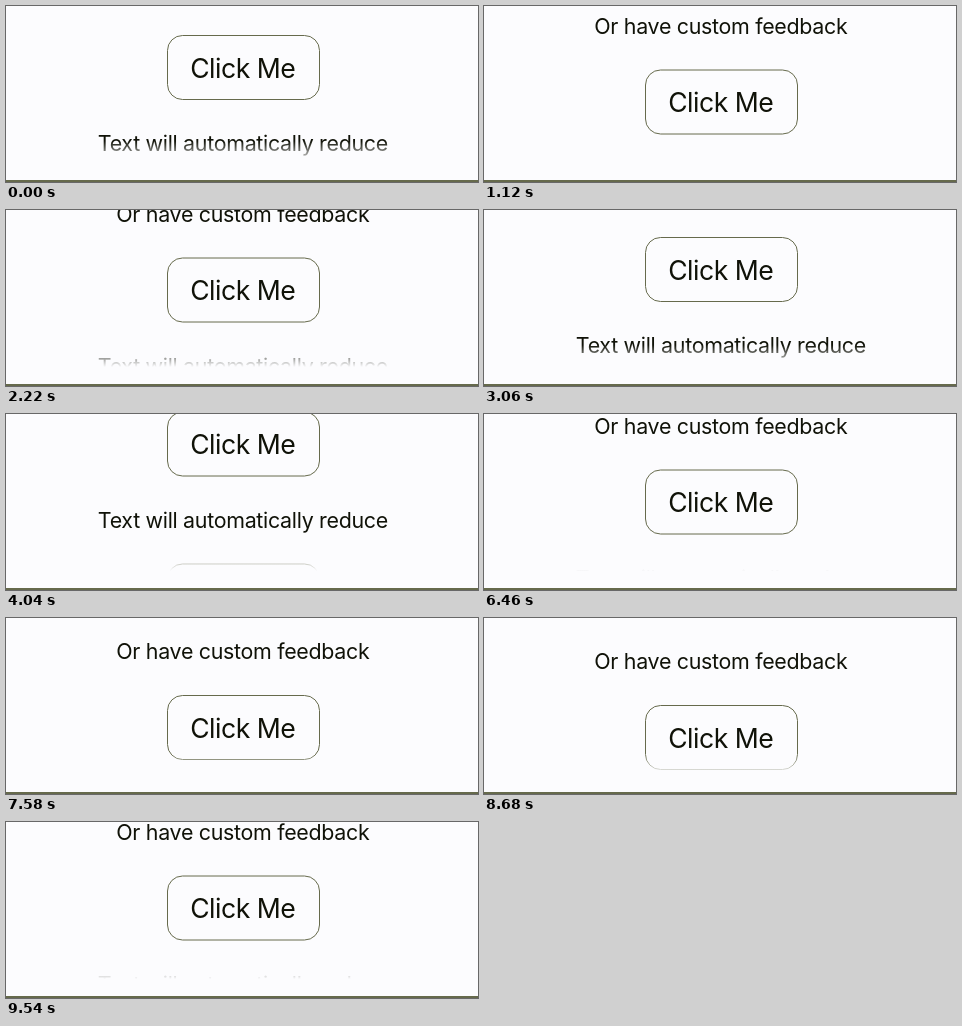
Animation, 472 px wide and 176 px high, one loop 9.56 s. Source, as an HTML page with a canvas:

```html
<!DOCTYPE html>
<html lang="en">
<head>
<meta charset="utf-8">
<style>
  html, body { margin: 0; width: 100%; height: 100%; overflow: hidden; background: #fcfcfe; }
  canvas { display: block; }
</style>
</head>
<body>
<canvas id="stage" width="472" height="176"></canvas>
<script>
const ctx = document.getElementById('stage').getContext('2d');
const LOOP = 9560, CENTER = 237, ROW = 152;
const INK = '#101208', EDGE = '#666a4c', PAPER = '#fcfcfe';

// Resting tops of the first button: one long flick, then flicks at a steady beat.
const START = 29, FIRST_REST = 66;
const RESTS = [38, 8, -20, 12, 57, 77, 87, 53.5];
const FIRST_BEAT = 1960, BEAT = 977, FLICK = 870;

// Eased progress of a flick that starts at `from`.
function progress(t, from, duration, power) {
  const p = Math.min(1, Math.max(0, (t - from) / duration));
  return 1 - (1 - p) ** power;
}

function buttonTop(t) {
  let top = START + (FIRST_REST - START) * progress(t, 440, 1380, 4);
  RESTS.forEach((rest, i) => {
    top += (rest - top) * progress(t, FIRST_BEAT + i * BEAT, FLICK, 3);
  });
  return Math.round(top * 2) / 2;
}

function label(text, baseline, size, spacing) {
  ctx.font = `${size}px Inter, sans-serif`;
  ctx.letterSpacing = spacing + 'px';
  ctx.fillStyle = INK;
  ctx.fillText(text, CENTER + spacing / 2, baseline);
}

function button(top) {
  ctx.strokeStyle = EDGE;
  ctx.beginPath();
  ctx.roundRect(161.5, top + 0.5, 152, 64, 15);
  ctx.stroke();
  label('Click Me', top + 42.5, 26.6, -0.5);
}

const fade = ctx.createLinearGradient(0, 135, 0, 157);
fade.addColorStop(0, '#fcfcfe00');
fade.addColorStop(1, PAPER);

function draw(t) {
  const top = buttonTop(t);
  ctx.fillStyle = PAPER;
  ctx.fillRect(0, 0, 472, 176);
  ctx.textAlign = 'center';
  label('Or have custom feedback', top - 36, 21.4, -0.3);
  button(top);
  label('Text will automatically reduce', top + 116, 21.4, -0.3);
  button(top + ROW);
  ctx.fillStyle = fade;
  ctx.fillRect(0, 135, 472, 41);
  ctx.fillStyle = EDGE;
  ctx.fillRect(0, 174, 472, 2);
}

function tick() {
  draw(performance.now() % LOOP);
  requestAnimationFrame(tick);
}
tick();
</script>
</body>
</html>
```
